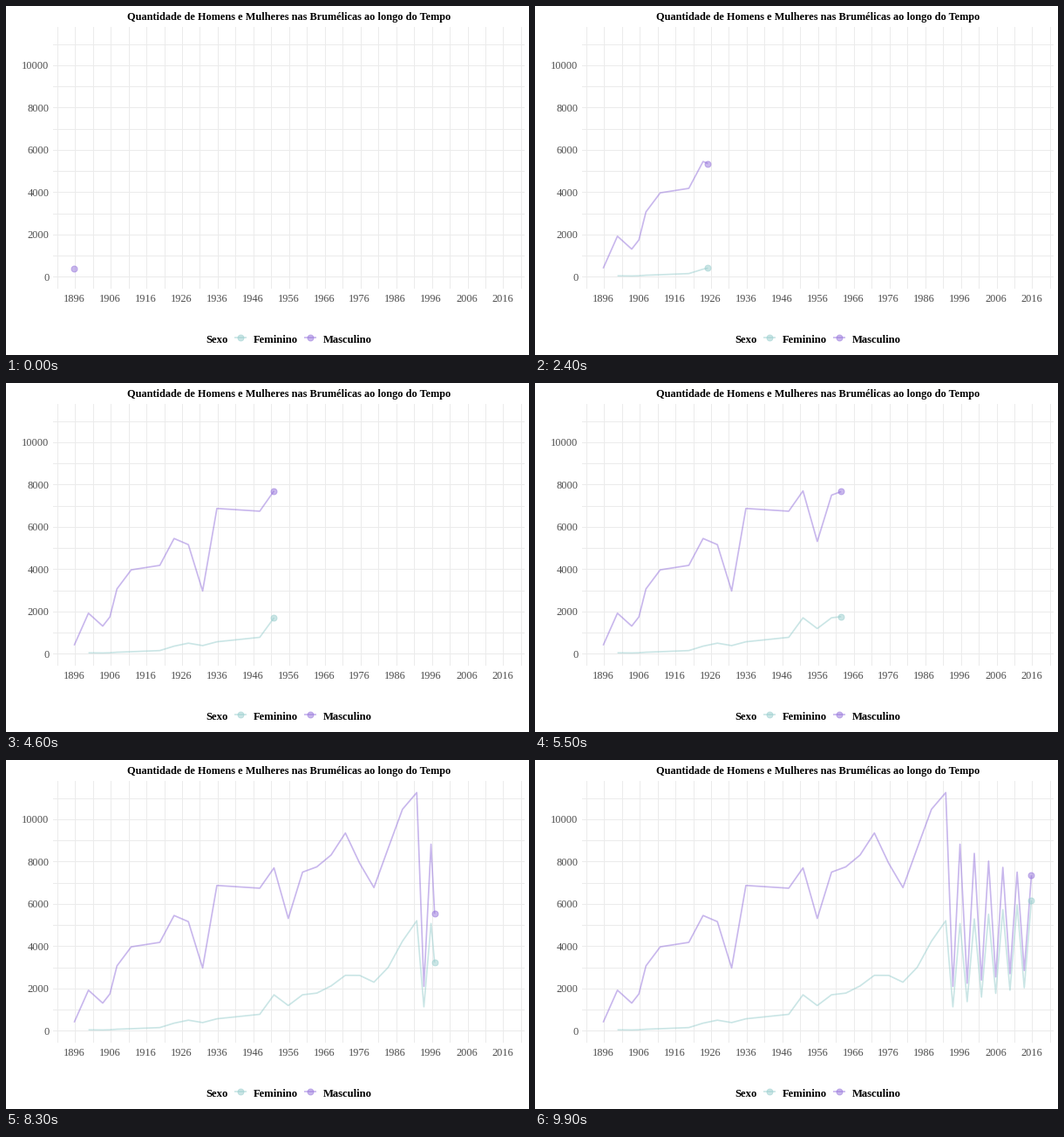
Animation, 600 px wide and 400 px high, one loop 10 s. Source, as a matplotlib script:

```python
import numpy as np
import matplotlib.pyplot as plt
from matplotlib.animation import FuncAnimation

W, H, DPI = 600, 400, 100
FRAMES, INTERVAL = 100, 100
START, END = 1896, 2016
PX = 72 / DPI  # one pixel in points

TEAL, PURPLE, GREY = "#96CDCD", "#9370DB", "#4D4D4D"
ALPHA = 0.5

plt.rcParams["font.family"] = "Liberation Serif"
fig = plt.figure(figsize=(W / DPI, H / DPI), dpi=DPI, facecolor="white")
ax = fig.add_axes([0, 0, 1, 1])
ax.set(xlim=(0, W), ylim=(H, 0))
ax.axis("off")


def make_data():
    """Years with the counts of men and women."""
    # every four years, with one extra event and the war years missing
    early = np.array(sorted(set(range(START, 1993, 4)) - {1916, 1940, 1944} | {1906}))
    men = 1000 * np.array([.38, 1.9, 1.29, 1.72, 3.05, 3.95, 4.16, 5.43, 5.14,
                           2.95, 6.85, 6.72, 7.68, 5.29, 7.48, 7.73, 8.29,
                           9.33, 7.9, 6.75, 8.61, 10.45, 11.24])
    # women as a share of men
    share = {1900: .014, 1912: .02, 1920: .032, 1932: .125, 1936: .08,
             1948: .113, 1952: .219, 1964: .228, 1972: .279, 1976: .329,
             1984: .346, 1992: .461}
    women = men * np.interp(early, list(share), list(share.values()))

    # afterwards small winter and large summer games alternate
    late = np.arange(1994, END + 1, 2)
    t = np.arange(len(late)) // 2
    winter = late % 4 == 2
    men_late = np.where(winter, 2080 + 150 * t, 8800 - 470 * t + 35 * t**2)
    women_late = np.where(winter, 1115 + 260 * t - 16 * t**2, 5050 + 220 * t)
    return (np.append(early, late), np.append(men, men_late),
            np.append(women, women_late))


def px(year):
    return 78.2 + 4.094 * (np.asarray(year) - START)


def py(count):
    return 309.9 - 0.02425 * np.asarray(count)


def label(x, y, s, size=12.4, **kw):
    ax.text(x, y, s, fontsize=size * PX, va="baseline", **kw)


def stroke(x, y, color, z=2):
    return ax.plot(x, y, color=color, alpha=ALPHA, lw=1.7 * PX, zorder=z,
                   solid_capstyle="butt", solid_joinstyle="round")[0]


def dot(x, y, color, z=4):
    return ax.plot(x, y, "o", color=color, alpha=ALPHA, ms=7 * PX,
                   mew=PX, zorder=z)[0]


def draw_grid():
    style = dict(color="#EBEBEB", lw=PX, zorder=0)
    for year in range(1891, 2022, 5):
        x = np.round(px(year)) + 0.5
        ax.plot([x, x], [24, 323], **style)
    for count in range(0, 11001, 1000):
        y = np.floor(py(count)) + 0.5
        ax.plot([54, 594], [y, y], **style)
    for year in range(START, END + 1, 10):
        label(px(year), 339, str(year), color=GREY, ha="center")
    for count in range(0, 10001, 2000):
        label(49.3, py(count) + 5, str(count), color=GREY, ha="right")


def draw_legend():
    bold = dict(size=12.6, weight="bold")
    label(229, 386, "Sexo", **bold)
    for x, name, color in ((269, "Feminino", TEAL), (349, "Masculino", PURPLE)):
        stroke([x - 7, x + 7], [380, 380], color)
        dot([x], [380], color)
        label(x + 15, 386, name, **bold)


class Series:
    """A line revealed over time, led by a dot."""

    def __init__(self, years, counts, color, z):
        self.x, self.y = px(years), py(counts)
        # each year lands on a whole step; motion is linear in between
        self.steps = np.round((years - START) * (FRAMES - 1) / (END - START))
        self.line = stroke([], [], color, z)
        self.head = dot([], [], color, z + 2)

    def update(self, i):
        if i < self.steps[0]:
            self.line.set_data([], [])
            self.head.set_data([], [])
            return
        n = np.searchsorted(self.steps, i, side="right")
        hx = np.interp(i, self.steps, self.x)
        hy = np.interp(i, self.steps, self.y)
        self.line.set_data(np.append(self.x[:n], hx), np.append(self.y[:n], hy))
        self.head.set_data([hx], [hy])


label(324.3, 16, "Quantidade de Homens e Mulheres nas Brumélicas ao longo do Tempo",
      size=12.3, weight="bold", ha="center")
draw_grid()
draw_legend()
years, men, women = make_data()
series = [Series(years[1:], women[1:], TEAL, 2), Series(years, men, PURPLE, 3)]


def update(i):
    for s in series:
        s.update(i)
    return [a for s in series for a in (s.line, s.head)]


anim = FuncAnimation(fig, update, frames=FRAMES, interval=INTERVAL,
                     repeat=True, repeat_delay=0)
plt.show()
```
